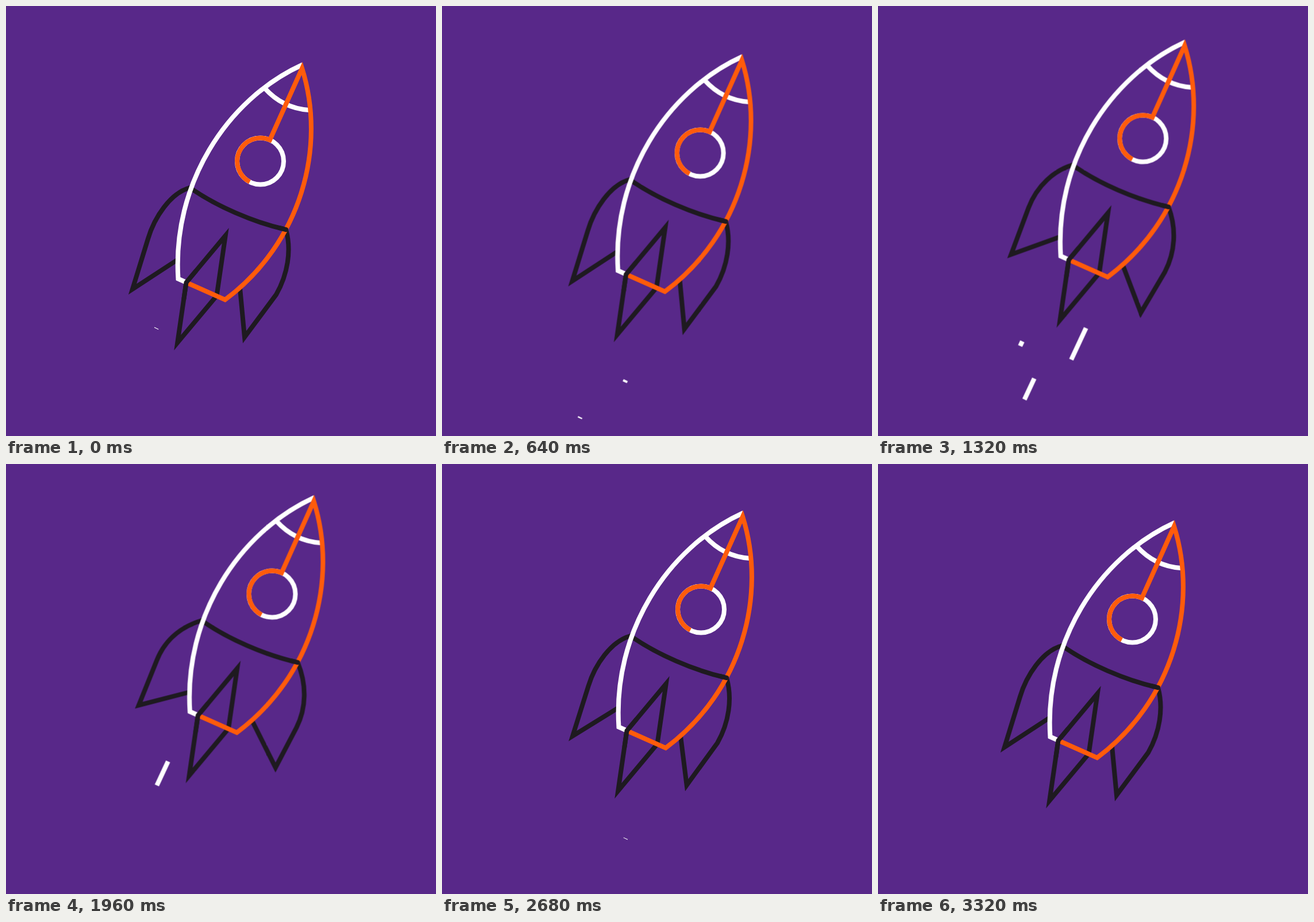
An HTML page without scripts that plays this animation: 748 by 748 pixels, repeating every 3.36 s.

```html
<!DOCTYPE html>
<html lang="en">
<head>
<meta charset="utf-8">
<title>Rocket</title>
<style>
  html, body { margin: 0; width: 100%; height: 100%; overflow: hidden; background: #582889; }
  svg { display: block; width: 100%; height: 100%; }
  path, circle { fill: none; stroke-width: 8; stroke-miterlimit: 8; }
  .white { stroke: #fff; }
  .orange { stroke: #ff5b0b; }
  .black { stroke: #1e1a20; }
  .round { stroke-linecap: round; stroke-linejoin: round; }

  .rocket { animation: fly 3360ms cubic-bezier(.333, 0, .667, 1) infinite; }
  @keyframes fly {
    0%, 99.4%, 100% { transform: translate(0, 0); }
    51.79% { transform: translate(21.5px, -46.2px); }
  }

  /* side fins swing outwards around the top of the flight */
  .fin { animation: 3360ms cubic-bezier(.333, 0, .667, 1) infinite; }
  .left { animation-name: left; }
  .right { animation-name: right; }
  @keyframes left {
    0%, 21.4%, 83.75%, 100% { d: path("M320 316C286 325 258 368 247 405L220 492.5L299 441"); }
    49.1%, 61% { d: path("M320 316C290 325 258 345 242 385L210.5 463.3L299 440.5"); }
  }
  @keyframes right {
    0%, 21.4%, 83.75%, 100% { d: path("M487 389C497 425 490 467 470 502L415 576L406.8 489"); }
    49.1%, 61% { d: path("M487 389C503 428 502 468 485 502L448.4 571.8L407.5 490"); }
  }

  /* exhaust dashes: gap, dash, gap measured upwards from the lane's lower end */
  .jet path {
    stroke-dasharray: 0 79 0 200;
    animation: jet 3360ms linear calc(var(--n) * 960ms + var(--lag)) infinite;
  }
  .n0 { --n: 0; }
  .n1 { --n: 1; }
  .n2 { --n: 2; }
  @keyframes jet {
    0% { stroke-dasharray: 0 79 0 200; }
    1.19% { stroke-dasharray: 0 32 46 200; }
    4.76% { stroke-dasharray: 0 16 61 200; }
    6.7% { stroke-dasharray: 0 8.5 41.5 200; }
    7.14% { stroke-dasharray: 0 7 36.5 200; }
    9.08% { stroke-dasharray: 0 3 22 200; }
    10.71% { stroke-dasharray: 0 1 9 200; }
    13.1% { stroke-dasharray: 0 .4 4 200; }
    16.67% { stroke-dasharray: 0 0 1 200; }
    17.86%, 100% { stroke-dasharray: 0 0 0 200; }
  }
</style>
</head>
<body>
<svg viewBox="0 0 748 748">
  <g class="rocket">
    <g class="jet white" style="--lag: 200ms">
      <path class="n0" d="M311.1 669l33.8-72.5"/>
      <path class="n1" d="M311.1 669l33.8-72.5"/>
      <path class="n2" d="M311.1 669l33.8-72.5"/>
    </g>
    <g class="jet white" style="--lag: 133ms">
      <path class="n0" d="M232.9 731.5l33.8-72.5"/>
      <path class="n1" d="M232.9 731.5l33.8-72.5"/>
      <path class="n2" d="M232.9 731.5l33.8-72.5"/>
    </g>
    <g class="jet white" style="--lag: 0ms">
      <path class="n0" d="M228.5 631.8l33.8-72.5"/>
      <path class="n1" d="M228.5 631.8l33.8-72.5"/>
      <path class="n2" d="M228.5 631.8l33.8-72.5"/>
    </g>

    <g class="black">
      <path class="fin left" d="M320 316C286 325 258 368 247 405L220 492.5L299 441"/>
      <path class="fin right" d="M487 389C497 425 490 467 470 502L415 576L406.8 489"/>
      <path d="M313.5 481L381.7 399.5L366.5 504L298.3 585.5Z"/>
      <path class="round" d="M320 316C365 348 430 376 487 389"/>
    </g>

    <g class="white">
      <path d="M516 102C382 163 289 312 299.5 474.5L314 481"/>
      <path d="M450 143Q481.5 178 527 181"/>
      <circle cx="442.5" cy="270" r="40.5"/>
    </g>

    <path class="orange" d="M316 482L381 511C514 412 558 245 515 108.5L459 233A40.5 40.5 0 0 0 424 306"/>

    <g class="black round">
      <path d="M476 386.2L487 389"/>
      <path d="M330 461.3L313.5 481L309.5 509"/>
    </g>
  </g>
</svg>
</body>
</html>
```
